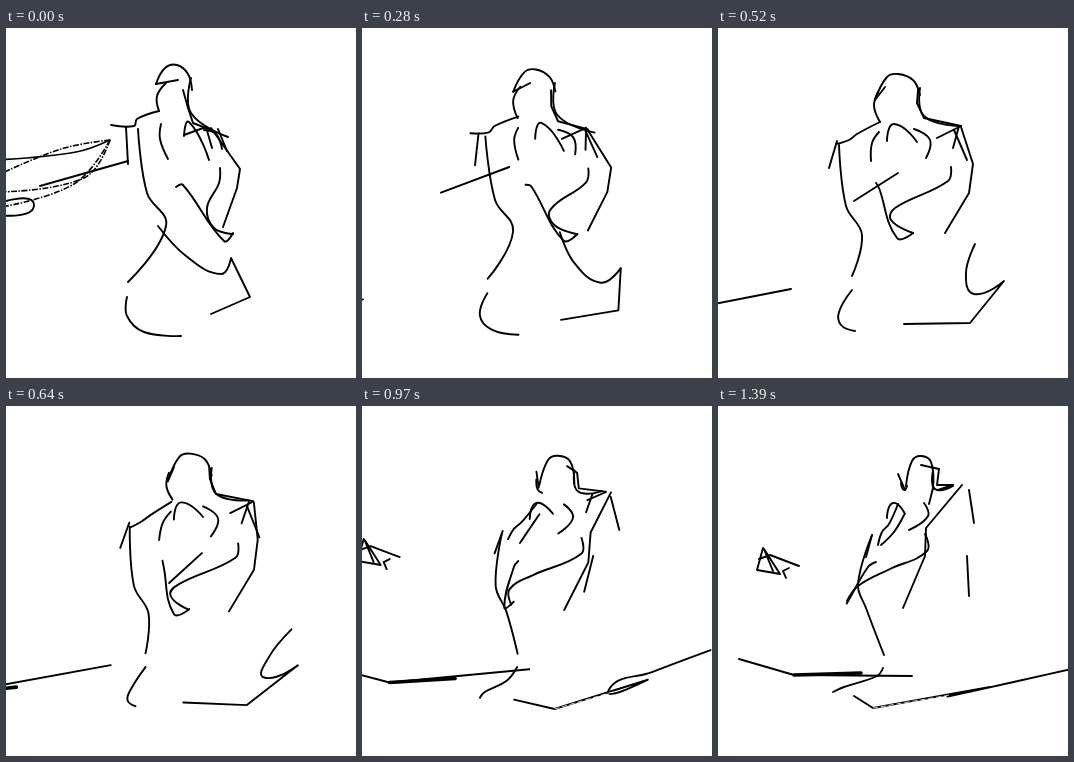
Recreate the animation shown at these times as an HTML page with a canvas. Size 350 px wide and 350 px high, loop 1420 ms.

```html
<!DOCTYPE html>
<html lang="en">
<head>
<meta charset="utf-8">
<title>Turning line figure</title>
<style>
html, body { margin: 0; width: 100%; height: 100%; overflow: hidden; background: #fff; }
canvas { display: block; width: 350px; height: 350px; }
</style>
</head>
<body>
<canvas width="350" height="350"></canvas>
<script>
const ctx = document.querySelector('canvas').getContext('2d');
const LOOP = 1420, HOLD = 70, STEP = 30, LAST = 45;

// How far the figure has turned, 0 to 1: a soft start and a long slow end
const turn = step => Math.sin(Math.PI / 2 * step / LAST) ** 1.3;
const MIDDLE = turn(16);
const strokes = [];

const parse = text => text.trim().split(/\s+/).map(p => p.split(',').map(Number));

// Each point swings on an arc through its place at the start, middle and end of the turn.
function swing(text, style) {
  const [a, b, c] = text.split('|').map(parse);
  const arc = (s, m, e, p) =>
    s * (p - MIDDLE) * (p - 1) / MIDDLE
    + m * p * (p - 1) / (MIDDLE * (MIDDLE - 1))
    + e * p * (p - MIDDLE) / (1 - MIDDLE);
  const at = p => a.map((_, i) => [0, 1].map(k => arc(a[i][k], b[i][k], c[i][k], p)));
  strokes.push({ at, ...style });
}

// A rigid shape that slides by (dx, dy) over the turn and is at home when p is `home`.
function slide(points, dx, dy, home, style) {
  const at = p => points.map(([x, y]) => [x + dx * (p - home), y + dy * (p - home)]);
  strokes.push({ at, ...style });
}

// Head
swing('150,56 159,40 171,37 182,46 186,62 | 157,72 169,49 180,46 195,52 202,67 | 188,80 194,55 203,50 213,56 215,83');
swing('150,56 172,52 | 157,72 167,59 | 187,84 180,68');
swing('160,55 151,68 153,83 | 160,64 156,78 162,94 | 183,77 186,84 189,80');

// Neck
swing('177,62 182,80 187,95 205,102 | 200,62 199,75 206,90 243,98 | 203,59 221,63 219,79 235,79', { corners: [1, 2] });
swing('185,50 185,85 222,109 | 202,60 206,88 241,98 | 215,65 217,83 235,80');

// Left shoulder and upper arm
swing('153,83 131,91 128,98 105,97 | 162,94 139,106 131,112 118,116 | 180,98 171,118 164,126 160,139');
swing('120,99 122,136 | 119,113 111,140 | 154,129 148,151');

// Collar
swing('155,96 154,111 162,131 | 161,104 154,115 153,133 | 186,109 176,126 163,139');
swing('178,108 183,94 203,132 | 169,113 176,96 199,114 | 169,112 175,97 187,108');
swing('198,102 210,106 216,121 | 196,101 212,112 208,130 | 206,97 210,110 191,124');

// Right shoulder and arm
swing('178,107 200,99 | 219,110 243,98 | 220,84 235,79');
swing('200,99 206,120 | 241,98 235,120 | 215,82 211,98');
swing('212,101 221,123 | 236,102 249,132 | 251,84 256,117');
swing('205,100 234,141 231,160 217,199 | 243,99 255,136 251,165 227,205 | 244,79 208,122 207,150 185,202', { corners: [1, 2] });

// Forearms
swing('214,140 213,155 201,180 208,200 227,206 | 233,139 230,153 177,180 173,192 195,205 | 207,128 209,145 172,163 140,180 129,195');
swing('170,159 177,157 218,213 227,205 | 158,155 161,160 179,210 195,205 | 158,156 150,161 129,197 133,190');
swing('122,133 34,158 | 180,145 136,173 | 249,150 251,190');

// Torso
swing('132,101 141,165 160,198 122,254 | 121,117 128,178 144,207 134,248 | 154,129 140,178 148,202 166,249');
swing('121,269 121,288 138,304 175,308 | 134,262 121,284 123,297 137,303 | 165,262 159,270 126,281 115,286');

// Hip, opening out into the ground on the right
swing(`152,198 180,228 215,246 225,230 244,269 205,286
  | 257,216 248,245 256,266 286,253 252,295 186,296
  | 380,257 300,275 232,290 272,281 155,302 136,290`, { corners: [3, 4] });
swing('244,269 232,245 | 252,295 272,270 | 155,302 232,289',
  { color: '#fff', width: 0.8, dash: [5, 3], from: 27 });

// Ground on the left
swing('-210,275 -170,300 -60,285 | -140,275 -85,292 73,261 | 21,253 76,269 194,270', { corners: [1] });
swing('-170,300 -100,290 | -85,292 -20,284 | 76,269 143,267', { width: 3.6 });

// Fan of sketch lines that leave on the left
for (let i = 0; i < 4; i++) {
  const bow = [[70, 124], [55, 121], [78, 150], [68, 156]][i];
  slide([[104, 112], bow, [-10, 132 + 16 * i]], -700, 100, 0,
    { width: 1.6, dash: i ? [6, 1.5, 1.5, 1.5] : [] });
}
slide(parse('-10,176 28,177 -10,187'), -700, 100, 0);

// Small scrap that enters on the left
for (const shape of ['45,142 39,164 62,168 46,143 55,165', '41,153 52,149 81,160', '71,162 65,165 68,172']) {
  slide(parse(shape), 290, 60, 1, { corners: [1, 2, 3] });
}

// Smooth line through the points, sharp at the given corners
function trace(points, corners) {
  const last = points.length - 1;
  const handle = (i, length) => {
    if (i === 0 || i === last || corners.includes(i)) return points[i];
    const [ax, ay] = points[i - 1], [bx, by] = points[i + 1];
    const k = length / (Math.hypot(bx - ax, by - ay) || 1);
    return [points[i][0] + (bx - ax) * k, points[i][1] + (by - ay) * k];
  };
  ctx.beginPath();
  ctx.moveTo(...points[0]);
  for (let i = 0; i < last; i++) {
    const [x, y] = points[i], [nx, ny] = points[i + 1];
    const reach = 0.38 * Math.hypot(nx - x, ny - y);
    ctx.bezierCurveTo(...handle(i, reach), ...handle(i + 1, -reach), nx, ny);
  }
  ctx.stroke();
}

function draw(step) {
  ctx.fillStyle = '#fff';
  ctx.fillRect(0, 0, 350, 350);
  ctx.lineJoin = 'round';
  for (const { at, corners = [], color = '#000', width = 1.9, dash = [], from = 0 } of strokes) {
    if (step < from) continue;
    ctx.strokeStyle = color;
    ctx.lineWidth = width;
    ctx.lineCap = dash.length ? 'butt' : 'round';
    ctx.setLineDash(dash);
    trace(at(turn(step)), corners);
  }
}

function tick() {
  const t = performance.now() % LOOP;
  draw(t < HOLD ? 0 : 1 + Math.floor((t - HOLD) / STEP));
  requestAnimationFrame(tick);
}
tick();
</script>
</body>
</html>
```
